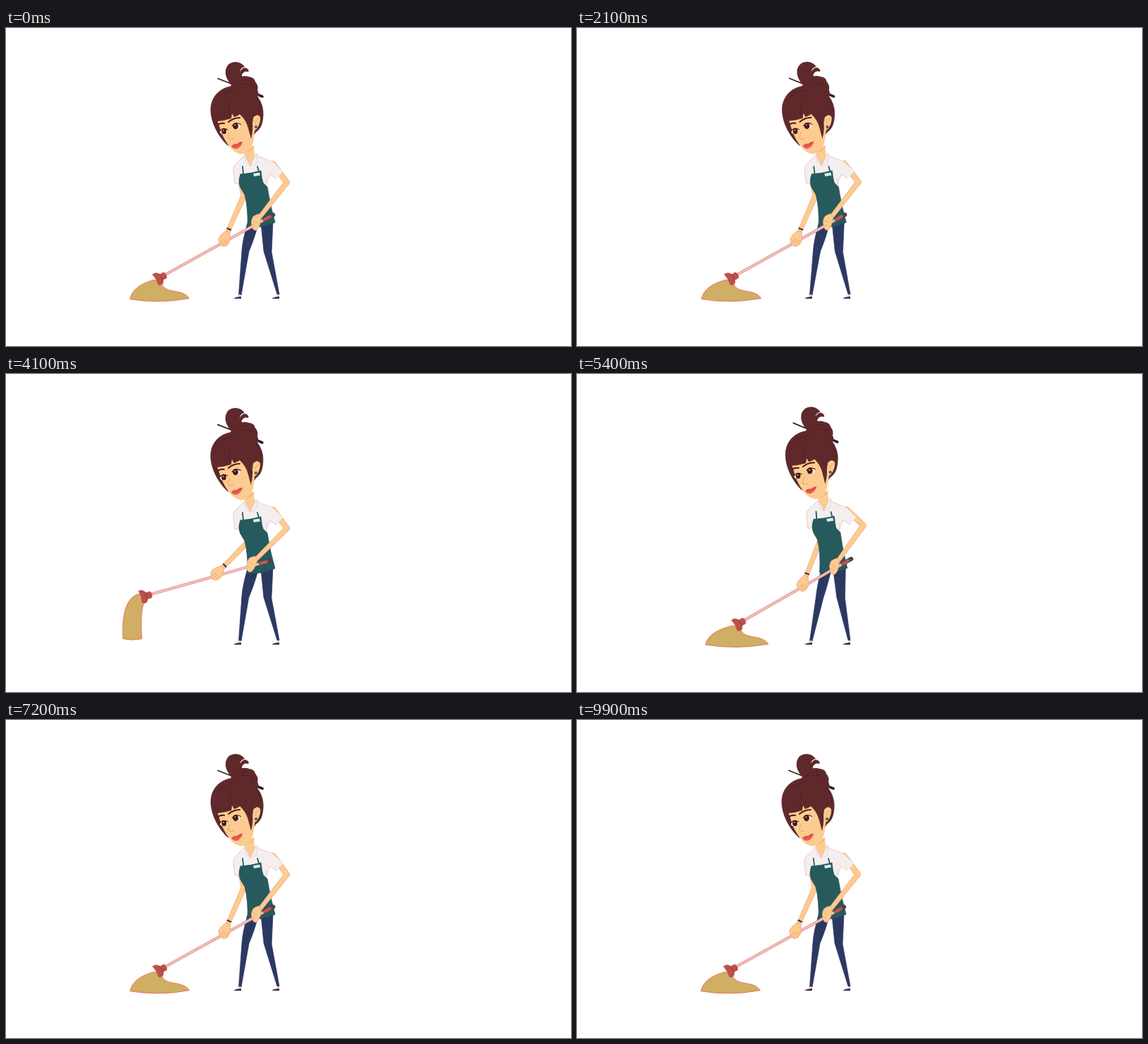
Write an HTML page with a canvas that moves like this. It is 800 px wide and 450 px high and loops after 10 s.

```html
<!DOCTYPE html>
<html lang="en">
<head>
<meta charset="utf-8">
<title>Mopping</title>
<style>
html, body { margin: 0; width: 100%; height: 100%; overflow: hidden; background: #fff; }
canvas { display: block; width: 800px; height: 450px; }
</style>
</head>
<body>
<canvas id="stage" width="800" height="450"></canvas>
<script>
const ctx = document.getElementById('stage').getContext('2d');
const SKIN = '#fccb8f', SKIN_EDGE = '#f2a184', HAIR = '#5f292b', HAIR_DARK = '#4a1e24';
const NAVY = '#2b3960', TEAL = '#265a5d', CLOTH = '#d0ae64', RED = '#b9524b';
const HANDLE = 187;

const clamp = (v, lo, hi) => Math.max(lo, Math.min(hi, v));
const mix = (a, b, s) => a + (b - a) * s;
const ease = s => s * s * (3 - 2 * s);

// Two strokes over the floor: 0 is rest, positive is forward.
function pushAt(u) {
  const keys = [[0, 0], [560, -.6], [1080, 1.7], [1690, -.6], [2200, 0]];
  const i = keys.findIndex(k => k[0] > u);
  if (i < 0) return 0;
  const [a, b] = [keys[i - 1], keys[i]];
  return mix(a[1], b[1], ease((u - a[0]) / (b[0] - a[0])));
}
function liftAt(u) {
  const up = ease(clamp((u - 2230) / 330, 0, 1)), down = ease(clamp((u - 3800) / 700, 0, 1));
  return (up - down) * (1 + .06 * Math.sin((u - 2800) / 200));
}

// Two-bone joint that bends to the right
function elbow([ax, ay], [bx, by], upper, fore) {
  const d = Math.hypot(bx - ax, by - ay);
  const bend = Math.acos(clamp((upper ** 2 + d ** 2 - fore ** 2) / (2 * upper * d), -1, 1));
  const a = Math.atan2(by - ay, bx - ax) - bend;
  return [ax + upper * Math.cos(a), ay + upper * Math.sin(a)];
}

function fill(d, color, edge, w = 1) {
  const path = typeof d === 'string' ? new Path2D(d) : d;
  ctx.fillStyle = color;
  ctx.fill(path);
  if (edge) line(path, edge, w);
}
function line(d, color, w) {
  ctx.strokeStyle = color;
  ctx.lineWidth = w;
  ctx.lineCap = ctx.lineJoin = 'round';
  ctx.stroke(typeof d === 'string' ? new Path2D(d) : d);
}
function oval(x, y, rx, ry, rot, color) {
  const p = new Path2D();
  p.ellipse(x, y, rx, ry, rot, 0, 7);
  fill(p, color);
}
function at(x, y, angle, draw) {
  ctx.save();
  ctx.translate(x, y);
  ctx.rotate(angle);
  draw();
  ctx.restore();
}

// Upper body turns a little about the hip.
function lean([x, y], k) {
  const a = -.04 * k, dx = x - 362, dy = y - 290;
  return [362 - 2.5 * k + dx * Math.cos(a) - dy * Math.sin(a),
    290 + 1.5 * k + dx * Math.sin(a) + dy * Math.cos(a)];
}
function leaning(k, draw) {
  at(362 - 2.5 * k, 290 + 1.5 * k, -.04 * k, () => {
    ctx.translate(-362, -290);
    draw();
  });
}

function arm(shoulder, hand, upper, fore) {
  const [x, y] = elbow(shoulder, hand, upper, fore);
  const a = Math.atan2(hand[1] - y, hand[0] - x), d = Math.hypot(hand[0] - x, hand[1] - y);
  for (const [color, grow] of [[SKIN_EDGE, .6], [SKIN, 0]]) {
    line(`M${shoulder}L${x} ${y}`, color, 7 + 2 * grow);
    at(x, y, a, () => fill(`M0 ${-3.5 - grow} L${d} ${-2.4 - grow} V${2.4 + grow} L0 ${3.5 + grow}Z`, color));
  }
  return a;
}

function legs(k) {
  const x = (v, m) => v - m * k;
  fill(`M${x(342, 7)} 276 Q${x(335, 9)} 300 ${x(334, 8)} 315 L329.5 378 L333 378
    L${x(344, 9)} 316 Q${x(351, 6)} 300 ${x(357, 5)} 278Z`, NAVY, '#2b2f72', .7);
  fill(`M${x(361, 3)} 276 L${x(365, 5)} 316 L384 377 L387 377
    L${x(376, 6)} 317 L${x(378, 4)} 274Z`, NAVY, '#2b2f72', .7);
  for (const f of [0, 54]) {
    line(`M${331 + f} 378v3`, SKIN, 2.5);
    fill(`M${322 + f} 383 Q${326 + f} 380 ${329 + f} 380.5 L${333 + f} 380 V383Z`, '#352c52');
  }
}

function torso() {
  fill('M340 166 L351 168 L352 180 L356 184 L346 197 L337 184Z', SKIN);
  line('M341 175 Q347 174 351 167', '#efb277', 1.4);
  fill(`M338 180 L327 191 Q321 195 322 202 L324 220 L331 219 L338 235 L369 228
    L369 219 L374 207 L382 213 L392 203 L377 189 L358 182 L354 177 L346 195Z`, '#f4efef', '#f0bfc2', .9);
  line('M338 180 L340 191 L346 195 L354 192 L356 180 M369 221 Q366 212 371 205', '#ddd3d5', .8);
  fill(`M332 207 Q346 206 361 202 Q362 213 364 219 L370 225 Q374 251 381 275
    Q367 283 342 282 Q343 255 338 236 L332 226 Q328 217 332 207Z`, TEAL, '#1f4a50', .7);
  line('M336 206 L335 196 M358 203 L356 196', TEAL, 1.8);
  fill('M350 206 L359 204.5 L360 208.5 L351 210Z', '#d6f2ee');
}

function eye(x, y, r, look) {
  oval(x, y, r + 1, r, -.35, '#fff7ee');
  oval(x + look, y + .2, r - .8, r - .3, 0, '#4e1c16');
  oval(x + look - .8, y - 1.2, .8, .8, 0, '#fff');
  line(`M${x - r - 1} ${y} Q${x - 1} ${y - r - 2} ${x + r + 1.5} ${y - 2}`, '#38130f', 1.1);
}

function head() {
  line('M300 71.5 L362 96', '#38222f', 1.8);
  line('M358 95 L363 97', '#2d2436', 3.6);
  fill(`M314 166 C300 153 289 132 290 113 C292 92 309 81 328 82
    C350 83 366 103 364 125 C363 137 360 143 354 147 L346 158Z`, HAIR, HAIR_DARK, .6);
  fill(`M299 130 L305 148 Q310 161 320 172 Q329 180 337 178 Q348 173 350 161
    L353 140 L342 118 L320 116Z`, SKIN);
  fill('M350 127 Q356 120 360 126 Q361 134 355 143 Q350 147 349 138Z', SKIN);
  line('M353 135 Q354 129 358 128', '#e8a66c', 1);
  oval(354, 140, 1.9, 2, 0, '#24302c');
  oval(354, 140, 1, 1.2, 0, '#4f9a72');
  fill(`M294 125 L299 132 Q310 131 319 128 L320 121 L323 126 Q329 124 331 122
    Q340 130 343 142 L347 157 Q351 142 348 125 L350 105 L300 104Z`, HAIR);
  line('M301 97 Q322 82 349 91 Q359 99 361 118 M319 103 Q313 115 317 125', HAIR_DARK, .8);
  line('M300 137 Q304 134 309 135 M315 133 Q322 127 331 127', '#4a1a16', 2);
  eye(308, 146, 4.2, .6);
  eye(326, 138.5, 4.8, -1);
  line('M317 148 Q314 154 315 156 Q318 159 322 157', '#e9a466', 1);
  fill('M319 167 Q323 163 327 164 Q331 160 335 161 Q333 169 326 171 Q321 171 319 167Z', '#ea5a55');
  line('M321 167 Q328 166 334 162', '#c23f3d', .8);

  fill('M317 86 C320 72 334 65 344 69 Q352 70 353 76 Q358 82 356 88 Q359 93 356 97 L340 92Z', HAIR);
  fill(`M320 82 Q309 70 311 59 Q314 48 325 48 Q333 48 338 55 Q332 56 331 62
    Q336 54 341 57 Q345 60 343 62 Q337 60 334 66 L334 78Z`, HAIR);
  line('M324 80 Q333 70 342 74 M334 79 Q345 76 352 84', HAIR_DARK, .8);
}

// Outline around the mop head, from a heap on the floor to hanging down
function cloth(hx, hy, hang, push, swing) {
  const heap = [[-7, 2], [-36, 10], [-40, 29], [0, 36], [44, 28], [34, 12], [6, 24], [4, 3]];
  const hung = [[-5, -4], [-32, 2], [-29, 60], [-15, 63], [-2, 60], [-3, 40], [-4, 20], [2, 6]];
  const p = heap.map(([x, y], i) => {
    const lag = i && i < 3 ? 9 * push : 0;
    const py = mix(y, hung[i][1], hang);
    return [hx + mix(x, hung[i][0], hang) + lag + swing * py / 60, hy + py];
  });
  fill(`M${p[0]}Q${p[1]} ${p[2]}Q${p[3]} ${p[4]}C${p[5]} ${p[6]} ${p[7]}Z`, CLOTH, '#e8705c', .9);
}

function mop([hx, hy], angle) {
  at(hx, hy, angle, () => {
    line(`M10 0H${HANDLE - 12}`, '#e58d88', 4);
    line(`M10 0H${HANDLE - 12}`, '#efc3bd', 2.4);
    fill('M-4 -9 Q0 -10 3 -7 L5 -4 H11 Q14 0 11 5 H5 L3 9 Q-1 11 -4 8 Q-2 0 -4 -9Z', RED, '#d9453f', .7);
    line('M4 -5 Q6 0 4 6', '#8f3d3b', 1);
    line(`M${HANDLE - 14} 0H${HANDLE - 1}`, '#4a4048', 6);
    line(`M${HANDLE - 14} 0H${HANDLE - 6}`, '#c1564f', 4.6);
    line(`M${HANDLE - 3} 0h1`, '#365457', 2.6);
  });
}

function farHand([x, y], angle) {
  at(x, y, angle + Math.PI, () => {
    line('M16 -2.6V2.6', '#3b2c36', 2);
    fill('M12 -3 Q5 -8 -3 -8 Q-10 -4 -10 2 Q-8 8 0 8 Q7 6 12 3Z', SKIN, SKIN_EDGE, .8);
    line('M-7 -3 L0 -1 M-8 1 L0 2 M-6 5 L1 5', '#e6a869', .9);
  });
}

function nearHand([x, y], lift) {
  at(x, y, .12 + .25 * lift, () => {
    fill('M4 -12 Q8 -6 6 2 Q5 10 1 12 Q-4 12 -5 6 Q-8 0 -5 -7 Q-1 -11 4 -12Z', SKIN, SKIN_EDGE, .7);
    line('M-4 -1 L1 1 M-4 4 L0 6', '#e6a869', .9);
  });
}

function drops(u) {
  for (let i = 0; i < 9; i++) {
    const age = u - 2700 - 113 * i, x = 160 + (20 + 12 * i) % 21, y = 346 + age * age * .001;
    if (age > 0 && y < 388) fill(`M${x} ${y - 2}l1.4 3h-2.8Z`, '#f3dde0', '#dc8f98', .6);
  }
}

function draw(t) {
  const u = t < 4900 ? Math.min(t, 4700) : (t - 4900) * .94;
  const lift = liftAt(u), rise = Math.max(0, liftAt(u + 50) - liftAt(u - 50));
  const k = pushAt(u) + lift * (.05 - .1 * Math.sin((u - 2800) / 200));

  // The handle follows from its upper end and its tilt.
  const deg = 29 - 1.5 * k - 21.6 * lift, angle = -deg * Math.PI / 180;
  const end = [379 - 7 * lift - 18 * k, 264 + 5 * k];
  const along = (d, up) => [end[0] - d * Math.cos(angle) + up * Math.sin(angle),
    end[1] - d * Math.sin(angle) - up * Math.cos(angle)];
  const tip = along(HANDLE, 0), far = along(78, 3), near = along(27, 3);

  ctx.fillStyle = '#fff';
  ctx.fillRect(0, 0, 800, 450);
  legs(k);
  const wrist = arm(lean([328, 197], k), far, 41, 68);
  leaning(k, torso);
  leaning(k, head);
  cloth(...tip, ease(clamp(lift / .6, 0, 1)), k, -24 * rise);
  mop(tip, angle);
  farHand(far, wrist);
  arm(lean([378, 192], k), near, 33, 71);
  leaning(k, () => fill('M356 184 L377 189 L392 203 L384 212 L373 205 L369 212Z', '#f4efef'));
  nearHand(near, lift);
  drops(u);
}

const t0 = performance.now();
function tick() {
  const t = (performance.now() - t0) % 10000;
  draw(Math.floor(t / 100) * 100);
  requestAnimationFrame(tick);
}
tick();
</script>
</body>
</html>
```
